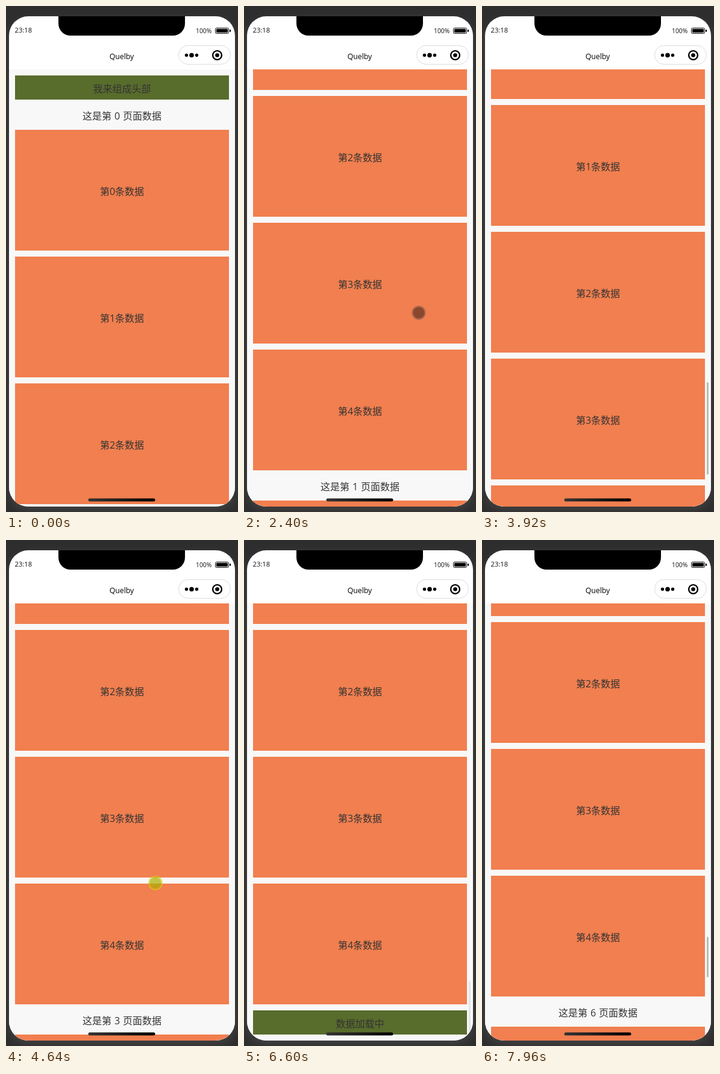
These frames come from a looping animation (385x838 px, 8 s). An HTML page:

```html
<!DOCTYPE html>
<html lang="zh">
<head>
<meta charset="utf-8">
<title>分页列表</title>
<style>
  html, body { margin: 0; width: 100%; height: 100%; overflow: hidden; background: #2e2e2e; }
  body { position: relative; font-family: "Open Sans", "Noto Sans CJK SC", "Noto Sans CJK", sans-serif; color: #333; }
  body * { box-sizing: border-box; }
  #phone, #glow { position: absolute; left: 5px; top: 17px; width: 375px; height: 812px; border-radius: 32px; }
  #phone { overflow: hidden; background: #fff; }
  #glow { box-shadow: 0 6px 16px rgba(255, 255, 255, .1); }
  #view { position: absolute; left: 0; top: 88px; width: 375px; height: 724px; overflow: hidden; background: #f8f8f8; }
  #list { padding: 10px; text-align: center; font-size: 16px; white-space: pre; }
  .band { height: 40px; line-height: 44px; background: #586c2c; }
  .title { height: 50px; line-height: 54px; word-spacing: .7px; }
  .item { height: 200px; line-height: 204px; background: #f17f4f; }
  .item + .item, .footer { margin-top: 10px; }
  #bar { position: absolute; left: 368px; width: 3px; border-radius: 2px; background: #bbb; }
  #chrome { position: absolute; left: 0; top: 0; }
  #chrome text { font-family: "Open Sans", "Noto Sans", sans-serif; }
  #cursor { position: absolute; left: 0; top: 0; width: 23px; height: 23px; margin: -11.5px 0 0 -11.5px;
    border-radius: 50%; border: 2px solid rgba(80, 70, 80, .43); background: rgba(0, 0, 0, .43) padding-box; }
  #cursor.pressed { width: 24px; height: 24px; margin: -12px 0 0 -12px; border-width: 2.5px;
    border-color: rgba(218, 210, 10, .6); background-color: rgba(171, 174, 0, .7); }
</style>
</head>
<body>
<div id="glow"></div>
<div id="phone">
  <div id="view"><div id="list"></div></div>
  <div id="bar"></div>
</div>
<svg id="chrome" width="385" height="838" viewBox="0 0 385 838">
  <defs>
    <linearGradient id="shade"><stop stop-color="#333"/><stop offset="1" stop-color="#000"/></linearGradient>
  </defs>
  <path d="M87 17H297V29a20 20 0 0 1-20 20H107a20 20 0 0 1-20-20Z"/>
  <text x="14.5" y="44" font-size="11.2" fill="#111">23:18</text>
  <text x="315" y="45" font-size="10.3" fill="#111">100%</text>
  <rect x="347.5" y="36.5" width="22" height="9" rx="2" fill="none" stroke="#000"/>
  <rect x="349" y="38" width="19" height="6" rx="1"/>
  <rect x="371" y="39" width="2" height="4" rx="1"/>
  <text x="192" y="88" font-size="12.3" text-anchor="middle">Quelby</text>
  <rect x="286.5" y="65.5" width="86" height="31" rx="15.5" fill="#fff" stroke="#dcdcdc"/>
  <circle cx="299.5" cy="81.5" r="2.7"/>
  <circle cx="308" cy="81.5" r="3.8"/>
  <circle cx="316.5" cy="81.5" r="2.7"/>
  <circle cx="350.5" cy="81.5" r="7.4" fill="none" stroke="#000" stroke-width="2.4"/>
  <circle cx="350.5" cy="81.5" r="3.3"/>
  <rect x="136.5" y="815.5" width="111" height="5" rx="2.5" fill="url(#shade)"/>
</svg>
<div id="cursor"></div>
<script>
const LOOP = 8000, VIEW = 724, PAGE = 1090, FIRST_END = 476;
const TRACK_TOP = 91.5, TRACK = 715;
const PRESS_LEAD = 36.6, APPROACH = 160, FLICK = 160, CURSOR_GONE = 280, LAST_CURSOR = 7200;

// One row per swipe: press time and place, scroll duration, time the next page loads.
const swipes = [
  [1200, 231, 557, 700, 2120],
  [2480, 279, 615, 600, 3280],
  [3520, 268, 588, 560, 4360],
  [4640, 248, 568, 480, 5520],
  [5680, 255, 575, 600, 6680],
  [6760, 252, 572, 560, 7720],
  [7908, 250, 570, 600, Infinity],
].map(([press, x, y, dur, load]) => ({ press, x, y, dur, load, start: press + PRESS_LEAD }));

const [list, bar, cursor] = ["list", "bar", "cursor"].map(id => document.getElementById(id));

function add(parent, className, text = "") {
  const el = document.createElement("div");
  el.className = className;
  el.textContent = text;
  return parent.appendChild(el);
}

add(list, "band", "我来组成头部");
const pages = swipes.map((_, p) => {
  const page = add(list, "page");
  add(page, "title", `这是第 ${p} 页面数据`);
  for (let i = 0; i < 5; i++) add(page, "item", `第${i}条数据`);
  return page;
});
add(list, "band footer", "数据加载中");

const clamp = v => Math.min(1, Math.max(0, v));
const flingEase = u => 1 - (1 - u ** 1.4) ** 2;
const mix = (a, b, u) => a + (b - a) * u;

function scrollAt(t) {
  return Math.round(swipes.reduce((sum, s, i) =>
    sum + (i ? PAGE : FIRST_END) * flingEase(clamp((t - s.start) / s.dur)), 0));
}

function barOpacity(t) {
  const s = swipes.findLast(s => t >= s.start);
  if (!s) return 0;
  const idle = t - s.start - s.dur;
  return idle < 200 ? 1 : idle < 340 ? .3 : 0;
}

function cursorAt(t) {
  if (t > LAST_CURSOR || t <= 400) return null;
  if (t < swipes[0].press) {
    const u = clamp((t - 400) / 400);
    return { x: mix(362, swipes[0].x, u), y: mix(850, swipes[0].y, u) };
  }
  for (const { press, x, y } of swipes) {
    const dt = t - press;
    if (dt <= -APPROACH || dt >= CURSOR_GONE) continue;
    if (dt < 0) {
      const u = 1 + dt / APPROACH;
      return { x: mix(300, x, u), y: mix(400, y, u) };
    }
    const u = Math.min(dt / FLICK, 1.2);
    return { x: mix(x, 296.5, u), y: mix(y, 276.5, u), pressed: u < 1 };
  }
  return null;
}

function draw(time) {
  const step = time < 6400 ? 80 : 40;
  const t = Math.floor(time / step) * step;
  const count = 1 + swipes.filter(s => t >= s.load).length;
  const scroll = scrollAt(t);
  const total = VIEW + FIRST_END + PAGE * (count - 1);

  pages.forEach((page, i) => { page.style.display = i < count ? "" : "none"; });
  list.style.transform = `translateY(${-scroll}px)`;

  bar.style.opacity = barOpacity(t);
  bar.style.top = TRACK_TOP + scroll / total * TRACK + "px";
  bar.style.height = VIEW / total * TRACK + "px";

  const c = cursorAt(t);
  cursor.style.display = c ? "" : "none";
  if (c) {
    cursor.className = c.pressed ? "pressed" : "";
    cursor.style.transform = `translate(${c.x}px, ${c.y}px)`;
  }
}

const begin = performance.now();
function frame() {
  draw((performance.now() - begin) % LOOP);
  requestAnimationFrame(frame);
}
frame();
</script>
</body>
</html>
```
